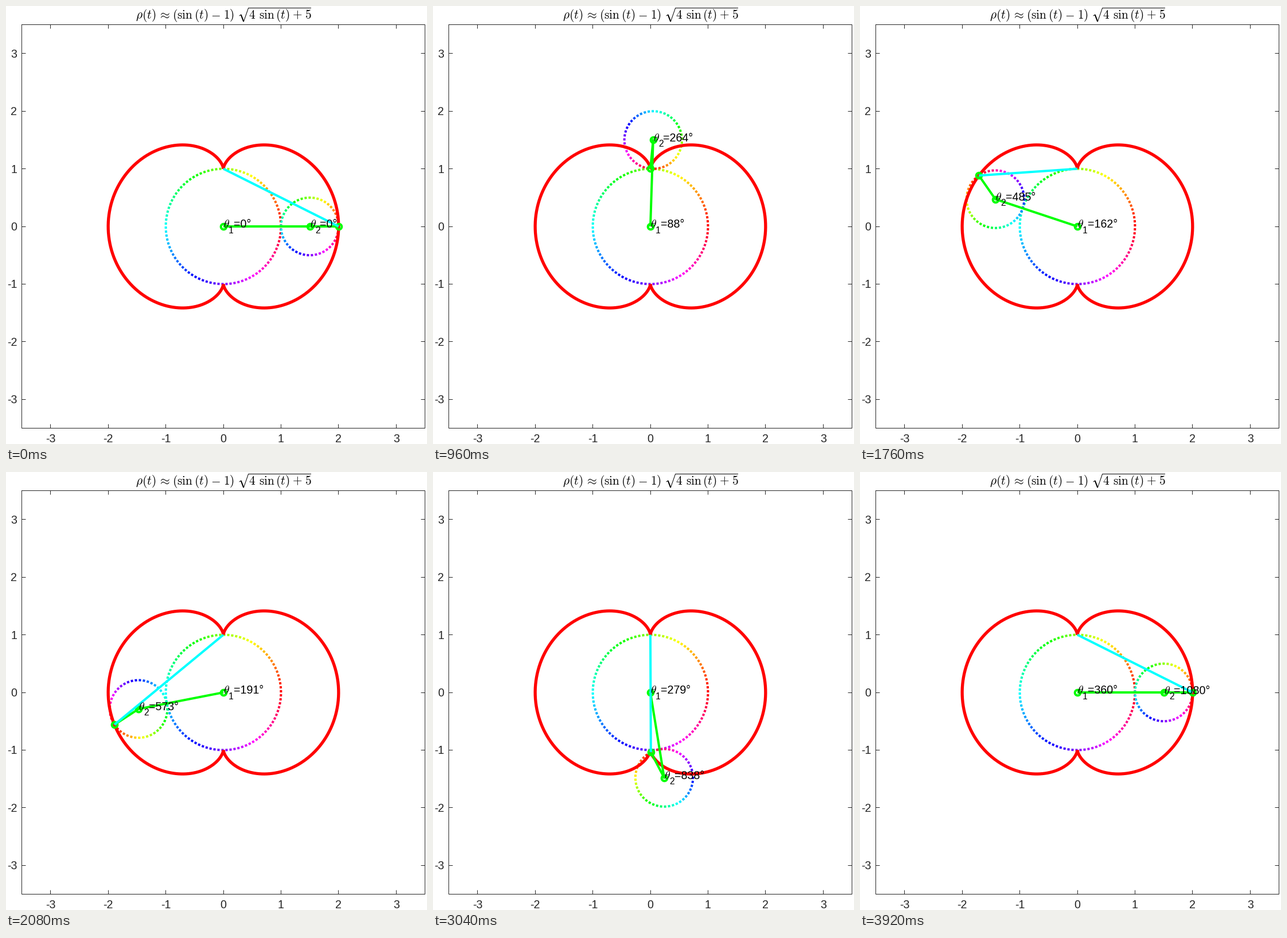
These frames come from a looping animation (734 by 763 pixels, 4000 ms). A matplotlib script:

```python
import colorsys
import numpy as np
import matplotlib.pyplot as plt
from matplotlib.animation import FuncAnimation
from matplotlib.collections import LineCollection

W, H, DPI = 734, 763, 64
PT = 72 / DPI                      # points per pixel
CX, CY, UNIT = 379, 384, 703 / 7   # centre and scale of the plot
LEFT, RIGHT, TOP, BOTTOM = 27.5, 730.5, 32.5, 735.5
GREY = "#262626"
FONT = 19.6
FRAMES = 50

plt.rcParams["font.family"] = "Liberation Sans"
plt.rcParams["mathtext.fontset"] = "cm"

fig = plt.figure(figsize=(W / DPI, H / DPI), dpi=DPI, facecolor="white")
ax = fig.add_axes([0, 0, 1, 1])
ax.set_xlim(0, W)
ax.set_ylim(H, 0)
ax.axis("off")


def px(x, y):
    """Plot units to stage pixels."""
    return CX + UNIT * np.asarray(x), CY - UNIT * np.asarray(y)


def stroke(x, y, color, width, z, **kw):
    kw.setdefault("solid_capstyle", "butt")
    return ax.plot(x, y, color=color, lw=width * PT, zorder=z, snap=False, **kw)[0]


def label(x, y, s, size, color="black", ha="left", z=9):
    return ax.text(x, y, s, fontsize=size * PT, color=color, ha=ha,
                   va="baseline", zorder=z)


def pen(t):
    return 1.5 * np.cos(t) + 0.5 * np.cos(3 * t), 1.5 * np.sin(t) + 0.5 * np.sin(3 * t)


def draw_axes():
    tick = 7
    stroke([LEFT, RIGHT, RIGHT, LEFT, LEFT], [TOP, TOP, BOTTOM, BOTTOM, TOP],
           GREY, 1, 1, solid_joinstyle="miter")
    for v in range(-3, 4):
        x, y = px(v, v)
        col, row = np.floor(x) + 0.5, np.floor(y) + 0.5
        for a, b in ((TOP, TOP + tick), (BOTTOM, BOTTOM - tick)):
            stroke([col, col], [a, b], GREY, 1, 1)
        for a, b in ((LEFT, LEFT + tick), (RIGHT, RIGHT - tick)):
            stroke([a, b], [row, row], GREY, 1, 1)
        label(x, 760.4, f"{v}", FONT, GREY, "center")
        label(19.4, y + 7, f"{v}", FONT, GREY, "right")


def draw_title():
    x0, base, em = 226.2, 21.5, 21.4
    parts = [(0, r"\rho(t)"), (2.989, r"(\mathrm{sin}"), (4.773, "(t)"),
             (7.134, "1)"), (9.189, "4"), (10.02, r"\mathrm{sin}"),
             (11.415, "(t)"), (13.776, "5")]
    for pos, s in parts:
        label(x0 + pos * em, base, f"${s}$", em)
    for pos, s in ((2.323, r"\approx"), (6.523, "-"), (13.165, "+")):
        label(x0 + pos * em, base, f"${s}$", em, ha="center")
    # radical sign with its bar
    x = x0 + 8.356 * em
    stroke([x + 1.6, x + 4.6], [17.2, 15], "black", 1, 9)
    stroke([x + 4.6, x + 9.2], [15, 27], "black", 2, 9)
    stroke([x + 9.2, x + 17.6, 532], [27.5, 3.5, 3.5], "black", 1, 9,
           solid_joinstyle="miter")


def dots(cx, cy, r, turn):
    """Short dashes along a circle that has been turned by an angle."""
    n = round(2 * np.pi * r * UNIT / 7)
    start = turn + np.arange(n) * 2 * np.pi / n
    ends = np.stack([start, start + 4 / (r * UNIT)], axis=1)
    return np.stack(px(cx + r * np.cos(ends), cy + r * np.sin(ends)), axis=2)


def rainbow(cx, cy, r, z):
    segs = dots(cx, cy, r, 0)
    colors = [colorsys.hsv_to_rgb(i / len(segs), 1, 1) for i in range(len(segs))]
    return ax.add_collection(LineCollection(
        segs, colors=colors, linewidths=4 * PT, capstyle="butt", zorder=z))


class AngleLabel:
    def __init__(self, index):
        self.parts = [(0, 2.5, label(0, 0, r"$\theta$", 20)),
                      (9.2, 11.5, label(0, 0, str(index), 15.7)),
                      (17.6, 2.5, label(0, 0, "", FONT))]

    def show(self, x, y, angle):
        for dx, dy, text in self.parts:
            text.set_position((x + dx, y + dy))
        self.parts[-1][2].set_text(f"={angle:.0f}°")


draw_axes()
draw_title()
rainbow(0, 0, 1, 2)
wheel = rainbow(1.5, 0, 0.5, 3)
for first in (-np.pi / 2, np.pi / 2):
    stroke(*px(*pen(np.linspace(first, first + np.pi, 300))), "red", 5.3, 4)

arm = stroke([], [], "lime", 4, 5, marker="o", markersize=9.6 * PT,
             markerfacecolor="none", markeredgewidth=4 * PT,
             solid_joinstyle="round")
chord = stroke([], [], "cyan", 4, 6)
label1, label2 = AngleLabel(1), AngleLabel(2)


def update(i):
    t = 2 * np.pi * i / (FRAMES - 1)
    hx, hy = 1.5 * np.cos(t), 1.5 * np.sin(t)
    tx, ty = pen(t)
    wheel.set_segments(dots(hx, hy, 0.5, 3 * t))
    arm.set_data(*px([0, hx, tx], [0, hy, ty]))
    chord.set_data(*px([0, tx], [1, ty]))
    label1.show(CX, CY, np.degrees(t))
    label2.show(*px(hx, hy), np.degrees(3 * t))
    return []


anim = FuncAnimation(fig, update, frames=FRAMES, interval=80,
                     repeat=True, repeat_delay=0, blit=False)
plt.show()
```
